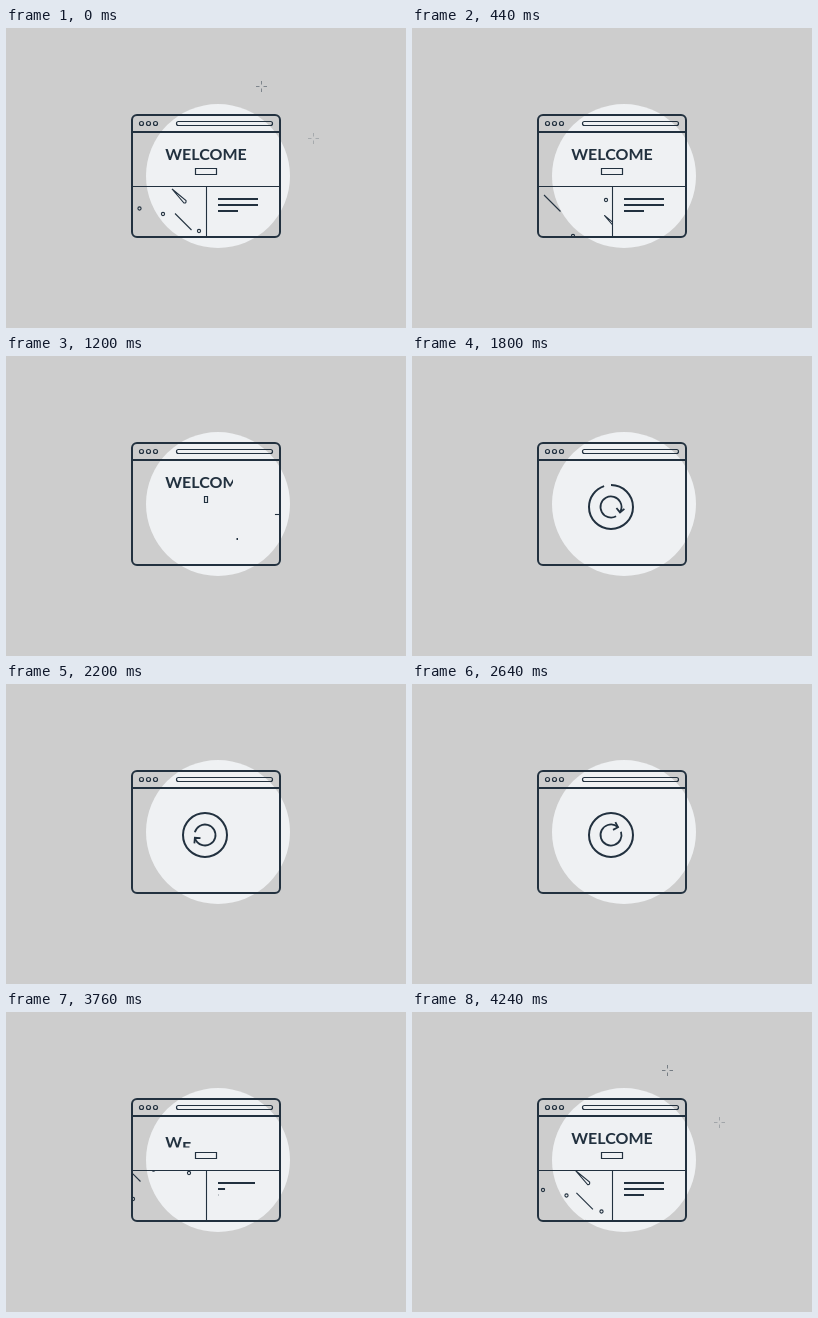
An HTML page with a canvas for the animation above (4.28 s loop, 400 px wide and 300 px high).

```html
<!DOCTYPE html>
<html lang="en">
<head>
<meta charset="utf-8">
<title>Page reload loop</title>
<style>
  html, body { margin: 0; width: 100%; height: 100%; overflow: hidden; background: #cdcdcd; }
  canvas { display: block; width: 400px; height: 300px; }
</style>
</head>
<body>
<canvas id="stage"></canvas>
<script>
const LOOP = 4280, STEP = 40, INK = '#22313f', RAD = Math.PI / 180;
const canvas = document.getElementById('stage');
const ctx = canvas.getContext('2d');
const dpr = window.devicePixelRatio || 1;
canvas.width = 400 * dpr;
canvas.height = 300 * dpr;

const ramp = (t, start, length) => Math.min(1, Math.max(0, (t - start) / length));
const ease = p => p < .5 ? 2 * p * p : 1 - 2 * (1 - p) ** 2;
const tween = (t, start, length) => ease(ramp(t, start, length));

// Diagonal drifters: kind, x, y at time `at`, speed in px/ms
const drifters = [
  ['dot', 133.5, 180.5, 0, .0625],
  ['dot', 157, 186, 0, .0625],
  ['dot', 193, 203, 0, .0875],
  ['dot', 194, 172, 440, .0625],
  ['dot', 183, 161, -520, .0625],
  ['dot', 127, 187, -520, .0625],
  ['comet', 166, 161, 0, .06],
  ['streak', 169, 185.5, 0, .115],
  ['streak', 132, 167, 440, .115],
  ['streak', 118, 153, -520, .115]
];

// Sparkles: x, y, birth, life, peak opacity
const sparkles = [
  [284.5, 77.5, -460, 380, .4],
  [307.5, 110.5, -420, 740, .52],
  [255.5, 58.5, -340, 740, .85]
];

function stroke(width, build) {
  ctx.lineWidth = width;
  ctx.beginPath();
  build();
  ctx.stroke();
}

function line(x1, y1, x2, y2, width) {
  if (x1 === x2 && y1 === y2) return;
  stroke(width, () => { ctx.moveTo(x1, y1); ctx.lineTo(x2, y2); });
}

function ring(x, y, r, width) {
  stroke(width, () => ctx.arc(x, y, r, 0, 2 * Math.PI));
}

function clipped(x, y, w, h, draw) {
  ctx.save();
  ctx.beginPath();
  ctx.rect(x, y, w, h);
  ctx.clip();
  draw();
  ctx.restore();
}

// A line that grows from its first end, then leaves the same way
function wipeLine(x, y, dx, dy, width, t, out, outLength, into, intoLength) {
  const a = t < 2400 ? tween(t, out, outLength) : 0;
  const b = t < 2400 ? 1 : tween(t, into, intoLength);
  line(x + dx * a, y + dy * a, x + dx * b, y + dy * b, width);
}

function drawWindow() {
  ctx.fillStyle = '#cdcdcd';
  ctx.fillRect(0, 0, 400, 300);
  ctx.fillStyle = '#eff1f3';
  ctx.beginPath();
  ctx.arc(212, 148, 72, 0, 2 * Math.PI);
  ctx.fill();
  stroke(2, () => ctx.roundRect(126, 87, 148, 122, 5));
  line(126, 104, 274, 104, 2);
  for (const x of [135.5, 142.5, 149.5]) ring(x, 95.5, 2, 1.2);
  stroke(1.2, () => ctx.roundRect(170.5, 93.5, 96, 4, 2));
}

function drawLayout(t) {
  wipeLine(126, 158.5, 148, 0, 1.1, t, 635, 650, 3130, 620);
  wipeLine(200.5, 159, 0, 49, 1.1, t, 640, 400, 3380, 320);
  wipeLine(212, 171, 40, 0, 2, t, 782, 320, 3502, 320);
  wipeLine(212, 177, 40, 0, 2, t, 862, 320, 3665, 320);
  wipeLine(212, 183, 20, 0, 2, t, 942, 320, 3735, 320);

  const size = t < 2400 ? 1 - tween(t, 980, 300) : tween(t, 3420, 300);
  if (size > 0) stroke(1.2, () => ctx.rect(200 - 10.5 * size, 140.5, 21 * size, 6));
}

function drawTitle(t) {
  const word = 'WELCOME';
  ctx.font = '700 16px Lato, "Open Sans", sans-serif';
  ctx.fillStyle = INK;
  const full = ctx.measureText(word).width;
  const left = 200 - full / 2;
  if (t < 2400) {
    const shown = 84 * (1 - ramp(t, 1140, 336));
    clipped(157, 110, 1 + shown, 30, () => ctx.fillText(word, left, 132));
    return;
  }
  clipped(150, 110, 100, 25.5, () => {
    [...word].forEach((ch, i) => {
      const rise = ramp(t, 3640 + 60 * i, 160);
      if (!rise) return;
      const x = left + ctx.measureText(word.slice(0, i + 1)).width - ctx.measureText(ch).width;
      ctx.fillText(ch, x, 132 + 14 * (1 - rise));
    });
  });
}

function drawReload(t) {
  if (t < 1425 || t > 3260) return;
  const from = 360 * ramp(t, 2860, 400) - 90;
  const to = 360 * ramp(t, 1425, 395) - 90;
  if (to > from) stroke(2, () => ctx.arc(199, 151, 22, from * RAD, to * RAD));

  const grow = tween(t, 1425, 300) * (1 - tween(t, 2850, 280));
  if (!grow) return;
  ctx.save();
  ctx.translate(199, 151);
  ctx.rotate((31 + .3345 * (t - 1800)) * RAD);
  const end = 30 + 330 * grow;
  stroke(1.8, () => ctx.arc(0, 0, 10.5, 30 * RAD, end * RAD));
  ctx.rotate(end * RAD);
  ctx.translate(10.5, 0);
  ctx.rotate(-25 * RAD);
  const wing = 4 * Math.min(1, grow * 3);
  stroke(1.8, () => {
    ctx.moveTo(-wing, -wing);
    ctx.lineTo(0, 0);
    ctx.lineTo(wing, -wing);
  });
  ctx.restore();
}

function drawDrifters(u) {
  clipped(127, 159, 73, 49, () => {
    for (const [kind, x0, y0, at, speed] of drifters) {
      const move = (u - at) * speed, x = x0 + move, y = y0 + move;
      if (kind === 'dot') ring(x, y, 1.6, 1.1);
      else if (kind === 'streak') line(x, y, x + 16.5, y + 16.5, 1.1);
      else stroke(1.1, () => {
        ctx.moveTo(x, y);
        ctx.lineTo(x + 14, y + 11.5);
        ctx.quadraticCurveTo(x + 14.5, y + 14.5, x + 12, y + 14);
        ctx.closePath();
      });
    }
  });
}

function drawSparkles(u) {
  for (const [x, y, birth, life, peak] of sparkles) {
    const age = u - birth;
    if (age <= 0 || age >= life) continue;
    const reach = 2 + 3.5 * ramp(age, 0, 120);
    ctx.globalAlpha = peak * (1 - age / life);
    for (const [dx, dy] of [[1, 0], [-1, 0], [0, 1], [0, -1]]) {
      line(x + dx * 2, y + dy * 2, x + dx * reach, y + dy * reach, 1);
    }
    ctx.globalAlpha = 1;
  }
}

function draw() {
  const t = Math.floor(performance.now() % LOOP / STEP) * STEP;
  const u = t > 2400 ? t - LOOP : t; // signed time around the loop point
  ctx.setTransform(dpr, 0, 0, dpr, 0, 0);
  ctx.strokeStyle = INK;
  drawWindow();
  drawLayout(t);
  drawTitle(t);
  drawReload(t);
  drawDrifters(u);
  drawSparkles(u);
  requestAnimationFrame(draw);
}
draw();
</script>
</body>
</html>
```
